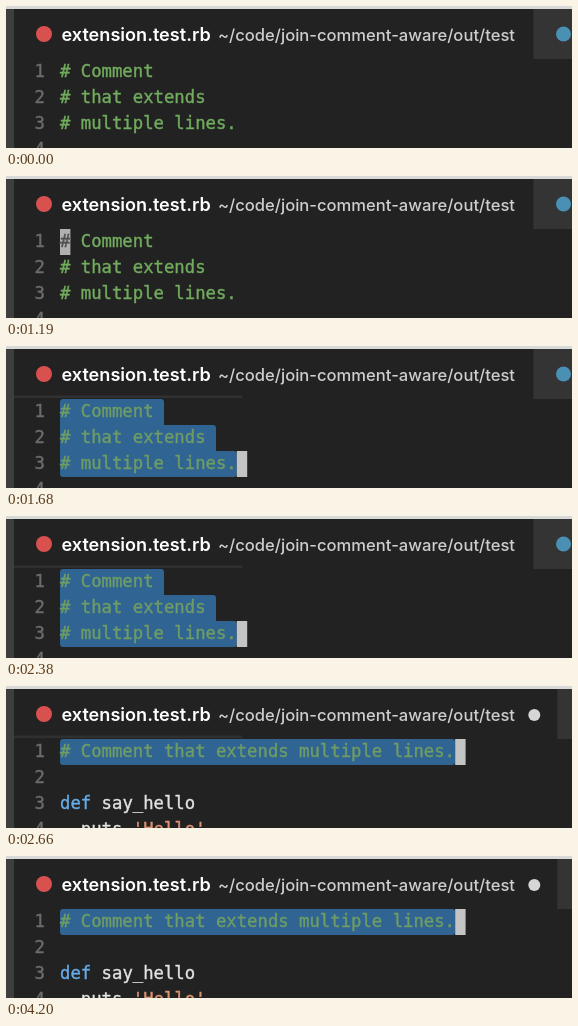
These frames come from a looping animation (566 by 142 pixels, 4.27 s). An HTML page:

```html
<!DOCTYPE html>
<html lang="en">
<head>
<meta charset="utf-8">
<title>Join comment lines</title>
<style>
  html, body { margin: 0; width: 100%; height: 100%; overflow: hidden; background: #222; }
  svg { display: block; width: 566px; height: 142px; }
  text { white-space: pre; }
  .code { font: 17.27px "DejaVu Sans Mono", monospace; }
  .code text { fill: currentColor; stroke: currentColor; stroke-width: .4px; }
  .name { font: 600 18.1px Inter, sans-serif; fill: #fff; }
  .path { font: 500 16.6px Inter, sans-serif; fill: #cecece; }
  .num { color: #6c6c6c; }
  .comment { color: #72ac5e; }
  .picked { color: #6f9c64; }
  .key { color: #66acea; }
  .plain { color: #e2e2e2; }
  .str { color: #de9270; }
  .dim { color: #505050; }
  .sel { fill: #2f6493; }
  .cursor { fill: #c4c4c4; }
</style>
</head>
<body>
<svg id="stage" viewBox="0 0 566 142">
  <rect width="566" height="142" fill="#222"/>
  <rect width="8" height="142" fill="#3e3e3e"/>
  <g id="nextTab">
    <rect x="527.5" y="3" width="60" height="50" fill="#343434"/>
    <circle cx="557.5" cy="28" r="7.5" fill="#4a8fb4"/>
  </g>
  <rect width="566" height="3" fill="#d8dada"/>
  <circle cx="38" cy="28" r="8" fill="#d9514f"/>
  <text class="name" x="55.5" y="35">extension.test.rb</text>
  <text class="path" x="212" y="35">~/code/join-comment-aware/out/test</text>
  <circle id="dot" cx="508.3" cy="29" r="6" fill="#d6d6d6"/>
  <rect id="edge" x="8" y="49.5" width="228" height="2.5" fill="#303030"/>
  <g id="code" class="code"></g>
</svg>
<script>
const LOOP = 4270, JOIN = 2450, GROW = 2520;
const LEFT = 54, TOP = 53, ROW = 26, CHAR = 10.4, BASE = 18;
const code = document.getElementById('code');

function add(tag, attrs, parent = code, content = '') {
  const el = document.createElementNS('http://www.w3.org/2000/svg', tag);
  for (const k in attrs) el.setAttribute(k, attrs[k]);
  el.textContent = content;
  parent.append(el);
  return el;
}

// Hard-edged track: each value holds until the next time.
function play(el, prop, steps) {
  const frames = steps.map(([ms, v]) => ({ offset: ms / LOOP, [prop]: v, easing: 'steps(1, end)' }));
  frames.push({ offset: 1, [prop]: steps[steps.length - 1][1] });
  el.animate(frames, { duration: LOOP, iterations: Infinity });
}

function during(el, from, to = LOOP) {
  const steps = from > 0 ? [[0, 0], [from, 1]] : [[0, 1]];
  if (to < LOOP) steps.push([to, 0]);
  play(el, 'opacity', steps);
}

const put = (s, row, cls, col = 0, parent = code) =>
  add('text', { x: LEFT + col * CHAR, y: TOP + row * ROW + BASE, class: cls }, parent, s);

const band = (row, cols) =>
  add('rect', { x: LEFT, y: TOP + row * ROW, width: cols * CHAR, height: ROW, rx: 3, class: 'sel' });

// Squares off the corners where two selected rows meet.
const seam = (row, cols) =>
  add('rect', { x: LEFT, y: TOP + row * ROW - 3, width: cols * CHAR, height: 6, class: 'sel' });

const block = (row, col) =>
  add('rect', { x: LEFT + col * CHAR, y: TOP + row * ROW, width: CHAR, height: ROW, class: 'cursor' });

for (let i = 0; i < 4; i++)
  add('text', { x: 39, y: TOP + i * ROW + BASE, class: 'num', 'text-anchor': 'end' }, code, i + 1);

const lines = ['# Comment', '# that extends', '# multiple lines.'];
const picks = [1330, 1470, 1610];

lines.forEach((s, i) => {
  const from = picks[i], to = picks[i + 1] || JOIN;
  during(band(i, s.length), from, to);
  if (i < 2) {
    during(band(i, s.length + 1), to, JOIN);
    during(seam(i + 1, s.length + 1), to, JOIN);
  }
  during(block(i, s.length), from, to);
});

lines.forEach((s, i) => {
  during(put(s, i, 'comment'), 0, picks[i]);
  during(put(s, i, 'picked'), picks[i], JOIN);
});

const first = add('g', {});
const start = block(0, 0);
start.style.fill = '#b0b0b0';
first.append(start);
put('#', 0, 'dim', 0, first);
during(first, 1050, picks[0]);

const joined = add('g', {});
const whole = '# Comment that extends multiple lines.';
joined.append(band(0, whole.length), block(0, whole.length));
put(whole, 0, 'picked', 0, joined);
put('def', 2, 'key', 0, joined);
put('say_hello', 2, 'plain', 4, joined);
put('puts', 3, 'plain', 2, joined);
put("'Hello'", 3, 'str', 7, joined);
during(joined, JOIN);

const dot = document.getElementById('dot');
during(dot, JOIN);
play(dot, 'transform', [[0, 'translateX(0px)'], [GROW, 'translateX(20px)']]);
play(document.getElementById('nextTab'), 'transform', [[0, 'translateX(0px)'], [GROW, 'translateX(23.5px)']]);
during(document.getElementById('edge'), 1400, 2730);
</script>
</body>
</html>
```
